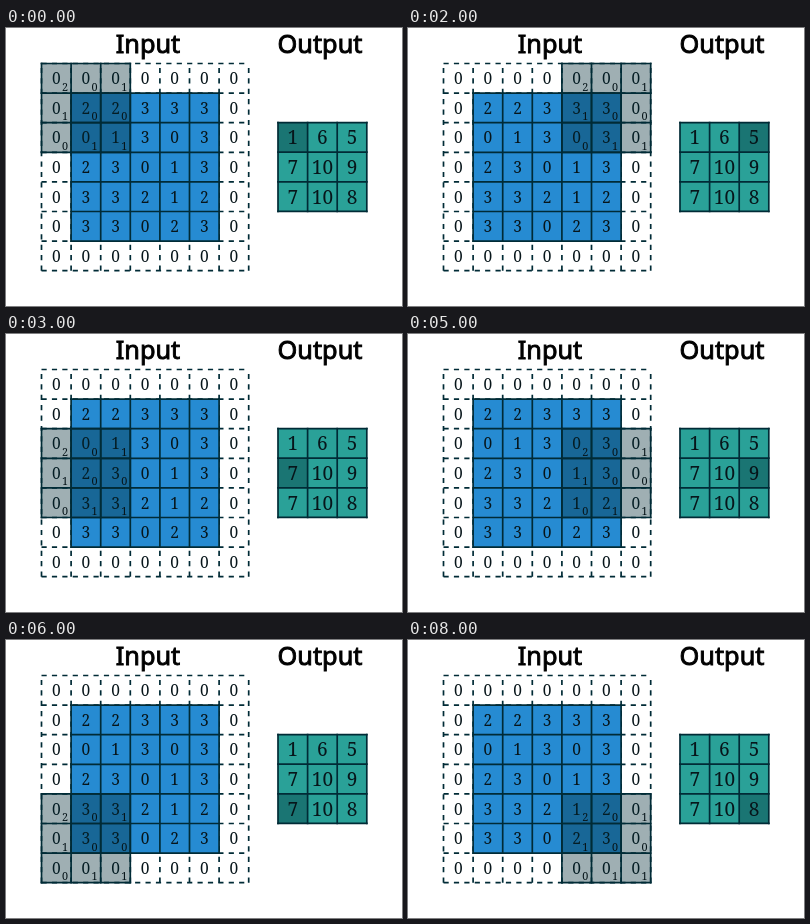
These frames come from a looping animation (396 px wide and 278 px high, 9000 ms). An HTML page:

```html
<!DOCTYPE html>
<html lang="en">
<head>
<meta charset="utf-8">
<title>Strided convolution</title>
<style>
html, body { margin: 0; width: 100%; height: 100%; overflow: hidden; background: #fff; }
svg { display: block; }
text { text-anchor: middle; font-family: "Noto Serif", serif; font-size: 15.5px; fill: #07151a; }
.title { font: 25.3px "Noto Sans", sans-serif; fill: #000; stroke: #000; stroke-width: .9px; }
.out { font-size: 19px; }
.sub { font-size: 10.8px; }
.line { fill: none; stroke: #002b36; stroke-width: 1.7px; stroke-linecap: square; }
.dash { stroke-dasharray: 5.2; stroke-linecap: butt; }
.shade { fill: #002b36; opacity: .375; }
</style>
</head>
<body>
<svg id="stage" width="396" height="278" viewBox="0 0 396 278"></svg>
<script>
const CELL = 29.6, LEFT = 35.5, TOP = 35.5, OUT_X = 272, OUT_Y = 94.6;
const STRIDE = 2, STEPS = 3, STEP_MS = 1000;
const input = ["0000000", "0223330", "0013030", "0230130", "0332120", "0330230", "0000000"];
const kernel = ["201", "100", "011"];
const output = [[1, 6, 5], [7, 10, 9], [7, 10, 8]];
const stage = document.getElementById("stage");

function add(parent, tag, attrs, content = "") {
  const el = document.createElementNS("http://www.w3.org/2000/svg", tag);
  for (const key in attrs) el.setAttribute(key, attrs[key]);
  el.textContent = content;
  return parent.appendChild(el);
}

function square(parent, n, attrs) {
  return add(parent, "rect", { width: n * CELL, height: n * CELL, ...attrs });
}

// Lines run rightwards and upwards, so dashes begin at the bottom left.
function grid(parent, n, cls = "line") {
  const size = n * CELL;
  for (let i = 0; i <= n; i++) {
    const p = i * CELL;
    add(parent, "path", { class: cls, d: `M0 ${p}H${size}` });
    add(parent, "path", { class: cls, d: `M${p} ${size}V0` });
  }
}

function digits(parent, rows, dx, dy, cls = "") {
  rows.forEach((row, r) => [...row].forEach((value, c) =>
    add(parent, "text", { class: cls, x: (c + .5) * CELL + dx, y: (r + .5) * CELL + dy }, value)));
}

const group = (x, y, parent = stage) => add(parent, "g", { transform: `translate(${x} ${y})` });

add(stage, "text", { class: "title", x: 142, y: 25 }, "Input");
add(stage, "text", { class: "title", x: 314, y: 25 }, "Output");

const left = group(LEFT, TOP);
grid(left, 7, "line dash");
const core = group(CELL, CELL, left);
square(core, 5, { fill: "#268bd2" });
grid(core, 5);
digits(left, input, 0, 5.8);

const filter = group(0, 0, left);
square(filter, 3, { class: "shade" });
grid(filter, 3);
digits(filter, kernel, 8.7, 12.4, "sub");

const right = group(OUT_X, OUT_Y);
square(right, 3, { fill: "#2aa198" });
const marker = square(right, 1, { class: "shade" });
grid(right, 3);
digits(right, output, 0, 7, "out");

function place(el, col, row, stride) {
  el.setAttribute("transform", `translate(${col * stride * CELL} ${row * stride * CELL})`);
}

function draw(now) {
  const step = Math.floor(now / STEP_MS) % (STEPS * STEPS);
  const col = step % STEPS, row = Math.floor(step / STEPS);
  place(filter, col, row, STRIDE);
  place(marker, col, row, 1);
  requestAnimationFrame(draw);
}
draw(performance.now());
</script>
</body>
</html>
```
